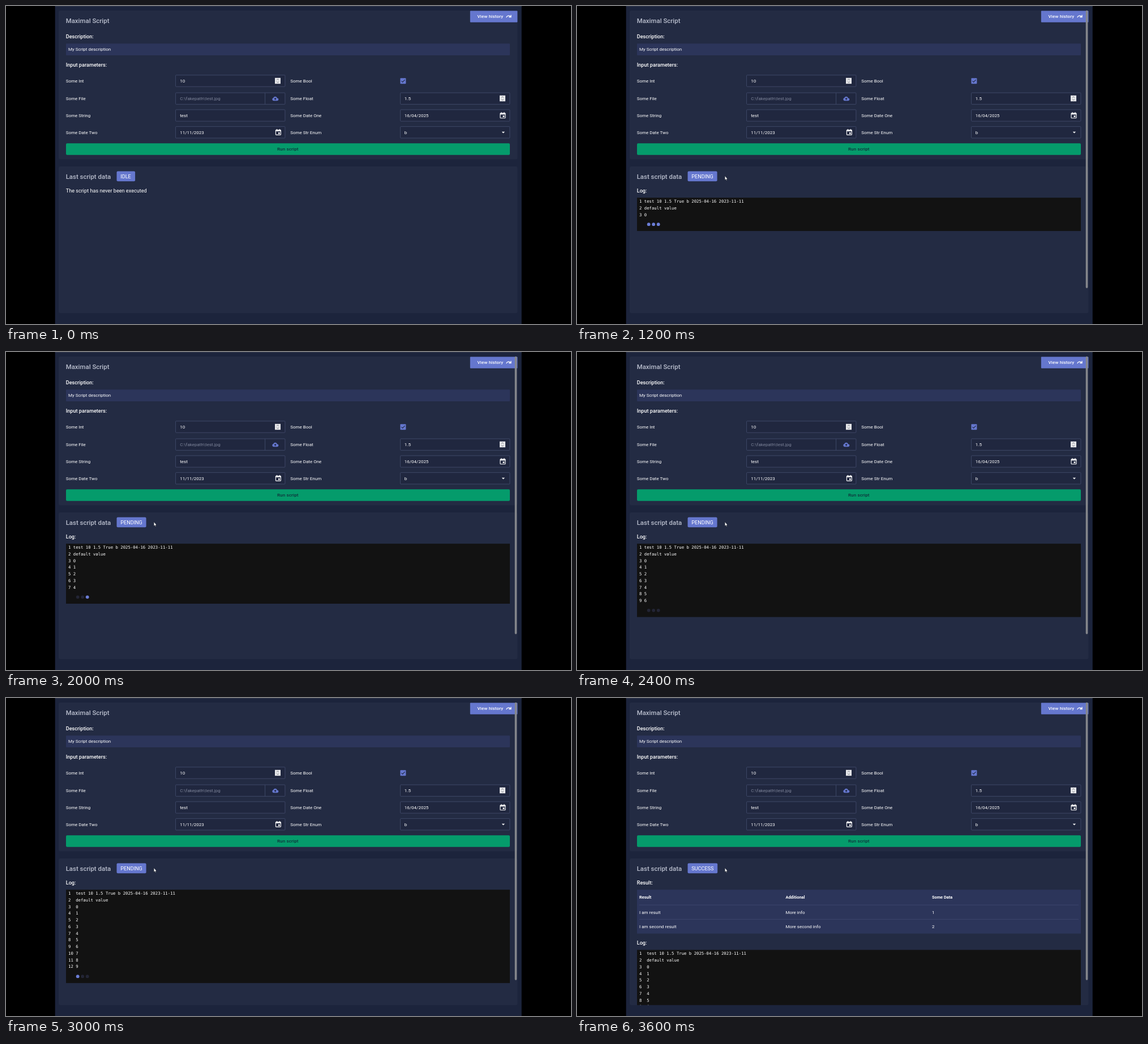
An HTML page for the animation above (4000 ms loop, 998x561 px).

```html
<!DOCTYPE html>
<html lang="en">
<head>
<meta charset="utf-8">
<title>Maximal Script</title>
<style>
  html, body { margin: 0; width: 100%; height: 100%; overflow: hidden; background: #000; }
  svg { display: block; width: 100%; height: 100%; }
  text { font-family: Roboto, sans-serif; font-size: 8px; fill: #fff; white-space: pre; }
  .title { font-size: 11.43px; font-weight: 500; fill: #b9becd; }
  .head { font-size: 9.14px; font-weight: 500; }
  .body { font-size: 9.14px; }
  .button { font-weight: 500; letter-spacing: .15px; }
  .dark { fill: #10303a; }
  .muted { fill: #7f869b; }
  .th { font-size: 7.43px; font-weight: 700; }
  .mono { font-family: "DejaVu Sans Mono", monospace; font-size: 7.314px; }
  .panel { fill: #232b43; }
  .strip { fill: #2c355a; }
  .primary { fill: #6577ce; }
  .field { fill: #20273f; stroke: #465070; stroke-width: .8; }
  .rule { stroke: #434d75; stroke-width: .7; }
</style>
</head>
<body>
<svg viewBox="0 0 998 561" preserveAspectRatio="none">
  <defs>
    <clipPath id="buttonClip"><rect x="106" y="242.3" width="784" height="20.4" rx="2"/></clipPath>
    <clipPath id="panelClip"><rect x="93" y="283" width="810.5" height="258.7"/></clipPath>
    <g id="spinner">
      <rect width="10" height="10.4" fill="#e6e7ea"/>
      <path d="M3 4 5 2 7 4M3 6.5 5 8.5 7 6.5" fill="none" stroke="#70737c" stroke-width=".9"/>
    </g>
    <g id="calendar" fill="none" stroke="#fff" stroke-width="1.1">
      <rect x=".6" y="1.7" width="9" height="8.7" rx=".8"/>
      <path d="M.6 3H9.6" stroke-width="2.2"/>
      <path d="M2.7 0V2M7.5 0V2"/>
      <rect x="5.2" y="6" width="2.7" height="2.7" fill="#fff" stroke="none"/>
    </g>
  </defs>

  <rect x="86.7" width="824" height="561" fill="#1c243c"/>
  <rect x="86.7" width="824" height="1" fill="#30374b"/>
  <rect class="panel" x="93" y="8" width="810.5" height="262.5" rx="3"/>
  <rect class="panel" x="93" y="283" width="810.5" height="258.7" rx="3"/>
  <rect class="primary" x="819.8" y="8.6" width="83.6" height="20.2" rx="1"/>
  <path d="M892 15.7V19.5H888.2M891.6 19.2C889.4 16.3 885.4 16.4 883.7 20.3" fill="none" stroke="#fff" stroke-width="1.3"/>
  <rect class="strip" x="106" y="66.3" width="784" height="20.7" rx="1"/>
  <g id="fields"></g>

  <path d="M457.6 153.2V173.5" stroke="#465070" stroke-width=".8"/>
  <path class="primary" d="M472.7 167.2A2.7 2.7 0 0 1 472.3 161.9A3.6 3.6 0 0 1 479 162.4A2.4 2.4 0 0 1 479 167.2Z"/>
  <path d="M475.6 161.8 473.4 164H474.8V165.8H476.4V164H477.8Z" fill="#20273f"/>
  <use href="#spinner" x="475" y="126.8"/>
  <use href="#spinner" x="872" y="157.8"/>
  <use href="#calendar" x="475.8" y="217"/>
  <use href="#calendar" x="872.4" y="187.3"/>
  <rect class="primary" x="696.4" y="127.2" width="10" height="10" rx="1"/>
  <path d="M698.6 132.3 700.6 134.3 704.5 130.2" fill="none" stroke="#1c243c" stroke-width="1.1"/>
  <path d="M875.7 221.8H881.1L878.4 224.5Z" fill="#fff"/>

  <g clip-path="url(#buttonClip)">
    <rect id="run" x="106" y="242" width="784" height="21"/>
    <circle id="ripple" cx="286.2" cy="255" r="40.5" fill="#0b9063"/>
  </g>
  <rect id="badge" class="primary" x="195.5" y="291.4" height="17.8" rx="2"/>
  <g id="labels"></g>
  <g id="output" clip-path="url(#panelClip)"></g>

  <rect id="scrollbar" x="898.7" y="7.8" width="3.6" height="490" rx="1.8" fill="#85878c"/>
  <path id="arrow" d="M261.2 299.7V307L262.8 305.6 263.9 308 265 307.5 264 305.2H266Z" fill="#fff" stroke="#11151f" stroke-width=".5"/>
  <path id="hand" d="M285.6 254.2Q286.5 253.2 287.3 254.2V257.5L290 258.2Q291.2 258.6 291 260L290.3 264.6H285.8L283.6 260.8Q283.6 259.6 284.7 260L285.6 260.8Z" fill="#fff" stroke="#16352e" stroke-width=".6"/>
</svg>
<script>
const LOOP = 4000, STEP = 200, LINE = 11.77, CHAR = 4.4;
const $ = id => document.getElementById(id);
const sizes = { title: 11.43, head: 9.14, body: 9.14, th: 7.43, mono: 7.314 };

// Text is placed by the middle of its capitals.
const text = (x, y, value, style = '', anchor = 'start') =>
  `<text x="${x}" y="${y + .355 * (sizes[style] || 8)}" class="${style}" text-anchor="${anchor}">${value}</text>`;
const rect = (x, y, w, h, attrs) => `<rect x="${x}" y="${y}" width="${w}" height="${h}" ${attrs}/>`;

const rows = [
  [132, 'Some Int', '10', 'Some Bool', ''],
  [163.2, 'Some File', 'C:\\fakepath\\test.jpg', 'Some Float', '1.5'],
  [193, 'Some String', 'test', 'Some Date One', '16/04/2025'],
  [222.8, 'Some Date Two', '11/11/2023', 'Some Str Enum', 'b'],
];
const field = (x, y) => rect(x, y - 10.1, 193.3, 20.3, 'class="field" rx="1"');

$('fields').innerHTML = rows.map(([y, , , , right]) =>
  field(299.6, y) + (right && field(696.6, y))).join('');

$('labels').innerHTML = [
  text(105.7, 26, 'Maximal Script', 'title'),
  text(832.5, 18.6, 'View history', 'button'),
  text(105.7, 54, 'Description:', 'head'),
  text(110, 76.6, 'My Script description'),
  text(105.7, 104, 'Input parameters:', 'head'),
  ...rows.map(([y, a, left, b, right]) =>
    text(105.7, y, a) + text(307.2, y, left, left.includes('\\') ? 'muted' : '') +
    text(502.2, y, b) + text(703.8, y, right)),
  text(497.8, 252.4, 'Run script', 'button dark', 'middle'),
  text(105.7, 300.7, 'Last script data', 'title'),
].join('');

const messages = ['test 10 1.5 True b 2025-04-16 2023-11-11', 'default value',
  ...Array.from({ length: 10 }, (_, i) => i)];

function log(top, count, phase) {
  const end = top + count * LINE;
  const column = 110 + (String(count).length + 1) * CHAR;
  let out = text(105.7, top - 12.2, 'Log:', 'head') +
    rect(106, top, 784, count * LINE + 23.4, 'fill="#121212"');
  messages.slice(0, count).forEach((message, i) => {
    const y = top + 6.2 + i * LINE;
    out += text(110, y, i + 1, 'mono') + text(column, y, message, 'mono');
  });
  for (let i = 0; phase !== null && i < 3; i++) {
    const lit = phase > i && phase <= i + 3;
    out += `<circle cx="${126.7 + i * 8.5}" cy="${end + 11.7}" r="2.9" fill="${lit ? '#6b7dd6' : '#232535'}"/>`;
  }
  return out;
}

function results() {
  const columns = [110, 368.4, 626.9];
  const table = [
    [351.8, 'th', 'Result', 'Additional', 'Some Data'],
    [378.2, '', 'I am result', 'More info', '1'],
    [403.5, '', 'I am second result', 'More second info', '2'],
  ];
  return text(105.7, 326, 'Result:', 'head') +
    rect(106, 338.2, 784, 77.4, 'class="strip"') +
    '<path class="rule" d="M110 365.1H886M110 390.4H886"/>' +
    table.map(([y, style, ...cells]) =>
      cells.map((cell, i) => text(columns[i], y, cell, style)).join('')).join('');
}

function output(time) {
  const badge = label => text(202.2, 300.4, label, 'body');
  if (time < 1200) return badge('IDLE') + text(105.7, 326, 'The script has never been executed', 'body');
  if (time >= 3200) return badge('SUCCESS') + results() + log(444.4, 12, null);
  const phase = Math.floor((time + 300) / 450) % 6;
  return badge('PENDING') + log(338.2, 3 + (time - 1200) / STEP, phase);
}

const show = (id, visible) => $(id).setAttribute('opacity', Number(visible));
let shown = -1;

function draw(now) {
  const time = Math.floor(now % LOOP / STEP) * STEP;
  if (time !== shown) {
    shown = time;
    const hover = time >= 800 && time < 1200;
    $('run').setAttribute('fill', hover ? '#04a570' : '#059b6b');
    $('badge').setAttribute('width', time < 1200 ? 32.6 : time < 3200 ? 52.1 : 52.7);
    show('ripple', time === 1000);
    show('hand', hover);
    show('arrow', time >= 1200);
    show('scrollbar', time < 400 ? 0 : time < 600 ? .5 : 1);
    $('output').innerHTML = output(time);
  }
  requestAnimationFrame(draw);
}
draw(performance.now());
</script>
</body>
</html>
```
